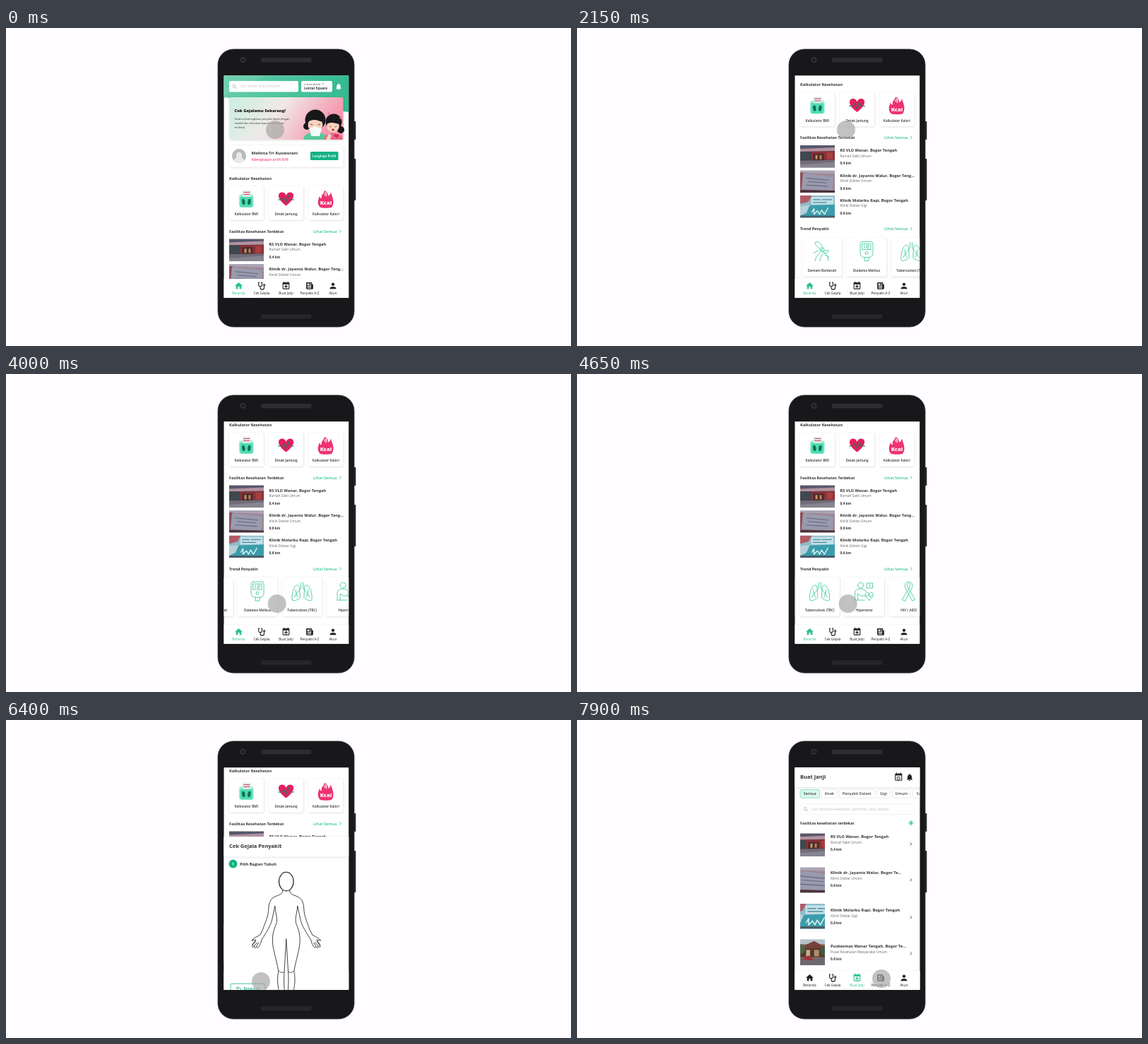
These frames come from a looping animation (800 by 450 pixels, 8000 ms). An HTML page:

```html
<!DOCTYPE html>
<html lang="id">
<head>
<meta charset="utf-8">
<title>Health app walkthrough</title>
<style>
html, body { margin: 0; width: 100%; height: 100%; overflow: hidden; background: #fffdff; }
svg { display: block; }
#stage { width: 100vw; height: 100vh; font-family: "Open Sans", "Noto Sans", sans-serif; }
</style>
</head>
<body>
<svg id="stage" viewBox="0 0 800 450"></svg>
<script>
const GREEN = '#12b184', MINT = '#2cc295', INK = '#333336', PINK = '#e61e5c';

// ---- drawing helpers ----
const text = (x, y, str, size, weight = 400, color = INK, anchor = 'start') =>
  `<text x="${x}" y="${y}" font-size="${size}" font-weight="${weight}" fill="${color}" text-anchor="${anchor}">${str}</text>`;
const rect = (x, y, w, h, fill, r = 0, extra = '') =>
  `<rect x="${x}" y="${y}" width="${w}" height="${h}" rx="${r}" fill="${fill}" ${extra}/>`;
const circle = (x, y, r, fill, extra = '') => `<circle cx="${x}" cy="${y}" r="${r}" fill="${fill}" ${extra}/>`;
const ellipse = (x, y, rx, ry, fill, extra = '') =>
  `<ellipse cx="${x}" cy="${y}" rx="${rx}" ry="${ry}" fill="${fill}" ${extra}/>`;
const path = (d, fill, extra = '') => `<path d="${d}" fill="${fill}" ${extra}/>`;
const line = (d, color, width = 1) =>
  path(d, 'none', `stroke="${color}" stroke-width="${width}" stroke-linecap="round" stroke-linejoin="round"`);
const at = (x, y, body, scale = 1) => `<g transform="translate(${x} ${y}) scale(${scale})">${body}</g>`;
const card = (x, y, w, h) => rect(x, y, w, h, '#fff', 2, 'filter="url(#soft)"');
const chevron = (x, y, color) => line(`M${x - .9} ${y - 1.7}l1.7 1.7l-1.7 1.7`, color, .9);
const magnifier = (x, y) => line(`M${x + 1.3} ${y + 1.3}l2 2`, '#aaa', .8) +
  circle(x - .4, y - .4, 2.1, 'none', 'stroke="#aaa" stroke-width=".7"');

// Icons live on a 24-unit grid.
const ICONS = {
  home: 'M10 20v-6h4v6h5v-8h3L12 3 2 12h3v8z',
  person: 'M12 12c2.2 0 4-1.8 4-4s-1.8-4-4-4-4 1.8-4 4 1.8 4 4 4zm0 2c-2.7 0-8 1.3-8 4v2h16v-2c0-2.7-5.3-4-8-4z',
  bell: 'M12 22c1.1 0 2-.9 2-2h-4c0 1.1.9 2 2 2zm6-6v-5c0-3.1-1.6-5.6-4.5-6.3V4a1.5 1.5 0 0 0-3 0v.7C7.6 5.4 6 7.9 6 11v5l-2 2v1h16v-1z',
  calendar: 'M19 3h-1V1h-2v2H8V1H6v2H5a2 2 0 0 0-2 2v14a2 2 0 0 0 2 2h14a2 2 0 0 0 2-2V5a2 2 0 0 0-2-2zm0 16H5V8h14z',
  plus: 'M10.8 9.5h2.4v2.8h2.8v2.4h-2.8v2.8h-2.4v-2.8H8v-2.4h2.8z',
  news: 'M3 3h15v5h3v11a2 2 0 0 1-2 2H5a2 2 0 0 1-2-2zM6 6v5h5V6zM13 6v2h3V6zM13 10v2h3v-2zM6 13v2h10v-2zM6 17v2h10v-2z',
};
const icon = (name, x, y, size, color) =>
  at(x - size / 2, y - size / 2, path(ICONS[name], color, 'fill-rule="evenodd"'), size / 24);
const stethoscope = (x, y, color) => at(x - 6.5, y - 6.5,
  line('M6 3H4v6a4.5 4.5 0 0 0 9 0V3h-2M8.5 13.5v3a5 5 0 0 0 10 0V12', color, 2) +
  circle(18.7, 9.5, 2, 'none', `stroke="${color}" stroke-width="2"`), .54);

const HEART = 'M0 9C-14-1-11-9-5.5-9C-3-9-1-7.5 0-5C1-7.5 3-9 5.5-9C11-9 14-1 0 9z';

function nav(active) {
  const tabs = [['Beranda', 329.5, 'home'], ['Cek Gejala', 362, ''], ['Buat Janji', 396.5, 'calendar'],
    ['Penyakit A-Z', 430, 'news'], ['Akun', 463, 'person']];
  return rect(308, 355, 178, 27, '#fff', 0, 'filter="url(#soft)"') + tabs.map(([label, x, name], i) => {
    const color = i === active ? MINT : '#222';
    return (name ? icon(name, x, 364.8, 13, color) : stethoscope(x, 365, color)) +
      (name === 'calendar' ? icon('plus', x, 364.8, 13, color) : '') +
      text(x, 377, label, 4.7, 400, color, 'middle');
  }).join('');
}

// ---- picture stand-ins, 50 x 32 ----
const PHOTOS = [
  rect(0, 0, 50, 32, '#5d3a42') + path('M0 0H50V4L0 7z', '#57586c') + path('M0 5L50 3V8L0 9z', '#b3929f') +
    rect(0, 9, 16, 13, '#3f474f') + rect(16, 9, 34, 12, '#8a3038') + rect(19, 12, 15, 10, '#452c2d') +
    rect(22, 14, 3, 6, '#cf8f62') + rect(28, 14, 3, 6, '#c07f58') + rect(38, 10, 9, 10, '#a73f40') +
    path('M0 22L50 21V32H0z', '#716c77') + path('M0 28L50 24V32H0z', '#858490'),
  rect(0, 0, 50, 32, '#9f8793') + path('M0 0H50V5L0 3z', '#a9a4b6') + rect(0, 3, 5, 24, '#8f4b55') +
    path('M4 4L48 9L46 29L2 27z', '#9a9aae') +
    line('M9 11L41 14M12 16L38 18M9 21L40 23', '#66667f', 1.1) + path('M0 28L50 29V32H0z', '#49343d'),
  rect(0, 0, 50, 32, '#8dbccb') + path('M0 0H17L12 9L0 12z', '#b25a66') + rect(16, 2, 32, 11, '#c5e0e6') +
    line('M19 6H29M32 6H45M19 10H38', '#4a8fa6', 1.4) + path('M0 15L50 13V32H0z', '#3a9dab') +
    path('M0 15L14 14L9 25L0 29z', '#b9cfd7') + line('M17 24l3-5v8l5-5 3 5 3-6 4 6 5-9', '#e0f3f4', 1.4) +
    rect(0, 29, 50, 3, '#4b5c68'),
  rect(0, 0, 50, 32, '#8b6a56') + rect(0, 0, 50, 6, '#b4c2cc') + path('M7 11L27 2L45 12z', '#77403a') +
    rect(10, 11, 31, 11, '#53392f') + circle(10, 12, 6, '#4b6549') + circle(40, 14, 6, '#405a41') +
    rect(17, 13, 5, 8, '#c8ab83') + rect(27, 13, 6, 8, '#b58d67') + rect(0, 23, 50, 9, '#6d6970') +
    path('M12 25l8-5 7 6z', '#a32f38'),
];
const photo = (i, x, y, w, h) =>
  `<svg x="${x}" y="${y}" width="${w}" height="${h}" viewBox="0 0 50 32" preserveAspectRatio="xMidYMid slice">${PHOTOS[i]}</svg>`;

const PLACES = [
  ['RS VLO Wanar, Bogor Tengah', 'Rumah Sakit Umum', '0,4 km'],
  ['Klinik dr. Jayanto Walur, Bogor Teng...', 'Klinik Dokter Umum', '0,6 km'],
  ['Klinik Molarku Rapi, Bogor Tengah', 'Klinik Dokter Gigi', '0,6 km'],
  ['Puskesmas Wanar Tengah, Bogor Te...', 'Pusat Kesehatan Masyarakat Umum', '0,6 km'],
];
const place = (x, y, [name, kind, distance], size) => text(x, y, name, size, 700) +
  text(x, y + 7.5, kind, 4.75, 400, '#666') + text(x, y + 18, distance, 4.8, 700);

// ---- home screen ----
const children =
  circle(438, 130, 14.5, '#18171a') + circle(426, 139, 5, '#18171a') +
  path('M421 158C422 149 430 148 438 148S454 149 456 158z', '#54c99c') +
  ellipse(438, 137, 10.5, 10, '#fbd2bf') + path('M427 133C430 124 447 124 449 133C442 132 437 127 427 133z', '#18171a') +
  line('M431 136l3 1M445 136l-3 1', '#333', .8) + path('M430 142L438 139L447 143L444 153L432 153z', '#f2fbf8') +
  circle(464, 133, 11.5, '#18171a') + circle(474, 144, 5, '#18171a') +
  path('M450 158C451 150 458 149 464 149S476 151 477 158z', '#e8688a') +
  ellipse(463, 139, 8.8, 8.6, '#fbd2bf') + path('M454 136C456 129 469 128 472 136C466 135 461 132 454 136z', '#18171a') +
  line('M458 139l2 1M468 139l-2 1', '#333', .8) + ellipse(463, 144, 2, 1.5, '#a93a4c') +
  path('M453 158L457 149L461 152L459 158z', '#fbd2bf') + at(468, 153, path(HEART, '#d92955'), .3) +
  circle(457, 121, 1.6, '#ef7895') + circle(474, 127, 1.8, '#ef7895');

const header = path('M308 66H486V119L308 98z', 'url(#headGrad)') + path('M308 66H370L308 96z', '#fff', 'opacity=".08"') +
  rect(316, 75, 98, 15.5, '#fff', 2) + magnifier(323.5, 82.6) +
  text(331.5, 84.4, 'Cari dokter atau penyakit', 4.8, 400, '#c6c6c6') +
  rect(418, 75, 44, 15.5, '#fff', 2) + text(422, 80.6, 'Lokasi Anda', 4.1, 400, '#555') +
  line('M447.5 78.5l1.3 1.2l1.3-1.2', '#555', .6) + text(422, 87, 'Lontar Square', 4.7, 700) +
  icon('bell', 471, 83, 11.5, '#fff');

const banner = rect(316, 98, 161.5, 60, 'url(#bannerGrad)', 3, 'filter="url(#soft)"') +
  text(323.5, 119.3, 'Cek Gejalamu Sekarang!', 5.8, 800, '#111') +
  ['Ketahui kemungkinan penyakit Anda dengan', 'mudah dan temukan layanan kesehatan', 'terdekat.']
    .map((s, i) => text(323.5, 129.6 + i * 6.2, s, 3.75, 400, '#333')).join('') + children;

const profile = card(316, 166, 161.5, 30.5) + circle(330, 181, 10, '#b9babb') +
  path('M322.5 187.5C324 184 326 185 326 181C325 174 335 174 334 181C334 185 336 184 337.5 187.5A10 10 0 0 1 322.5 187.5z', '#e9e9e9') +
  text(347.5, 179.4, 'Melinta Tri Kusworani', 6, 700) + text(347.5, 188, 'Kelengkapan profil 60%', 4.8, 400, PINK) +
  rect(431, 175, 39.5, 12, GREEN, 1.5) + text(450.7, 182.8, 'Lengkapi Profil', 4.65, 600, '#fff', 'middle');

const scale = rect(-10.5, -7, 21, 19, '#a5f0d8', 4) + rect(-9, -4, 18, 15.5, '#4fdcb1', 3) +
  rect(-5.5, -12, 12, 9, '#dcebe6', 1) + line('M-3.5-9.5H4.5M-3.5-6.5H4.5', '#d5455f', 1.2) +
  ellipse(-4, 4, 2.2, 4.2, '#0c7159', 'transform="rotate(-10 -4 4)"') + ellipse(4, 4, 2.2, 4.2, '#0c7159', 'transform="rotate(10 4 4)"');
const pulse = path(HEART, PINK, 'transform="scale(1.05)"') + line('M-11 1H-5L-3-3L0 5L3-6L5 1H11', '#15806a', 1);
const flame = path('M-8 12C-13 7-11 1-9-4C-8-1-7-1-6-1C-7-7-2-8-2-12C2-11 4-7 3-4C5-5 7-7 7-10C8-5 14 5 8 12C5 13-5 13-8 12z', '#ee3272') +
  path('M-3-6C-2-10 0-9 0-12C3-9 2-6 1-3z', '#f7a3bb') + text(0, 8, 'Kcal', 7.6, 800, '#fff', 'middle');
const calculators = text(316, 214.5, 'Kalkulator Kesehatan', 5.55, 700) +
  [['Kalkulator BMI', scale], ['Detak Jantung', pulse], ['Kalkulator Kalori', flame]].map(([label, art], i) =>
    card(316 + i * 56.3, 224, 48.5, 47.5) + at(340.3 + i * 56.3, 242, art) +
    text(340.3 + i * 56.3, 265.3, label, 4.7, 600, INK, 'middle')).join('');

const sectionTitle = (y, title) => text(316, y, title, 5.4, 700) +
  text(435, y, 'Lihat Semua', 5.6, 600, MINT) + chevron(473.5, y - 2, MINT);
const facilities = sectionTitle(289.5, 'Fasilitas Kesehatan Terdekat') + PLACES.slice(0, 3).map((p, i) =>
  photo(i, 316, 298.5 + i * 35.5, 49, 31.5) + place(372.5, 307.8 + i * 35.3, p, 5.65)).join('');

const DISEASES = [
  ['Demam Berdarah', 'M-3-3L10 8M-3-3a3 3 0 1 0 3-3M-5-2l-7 4M0-2C2-12-8-16-10-13C-9-8-5-5-1-4M2 0C12-6 12 2 3 2M-2 1l-6 6-2 6M1 3l-3 5-1 5M5 5l3 2 1 6'],
  ['Diabetes Melitus', 'M-6-14H6a3 3 0 0 1 3 3V2C9 6 6 8 4 8H-4C-6 8-9 6-9 2V-11a3 3 0 0 1 3-3zM-6-11H6V-3H-6zM-3-9V-5M0-9H3V-7H0V-5H3M-2 2a2 2 0 1 0 4 0a2 2 0 1 0-4 0M-3 8v5H3V8'],
  ['Tuberculosis (TBC)', 'M-1.5-13V-5C-3-2-6 0-8 3M1.5-13V-5C3-2 6 0 8 3M-4-8C-10-14-15 2-14 11C-13 15-5 11-3 9zM4-8C10-14 15 2 14 11C13 15 5 11 3 9zM-9-3L-8 3L-11 8M-8 3L-6 8M9-3L8 3L11 8M8 3L6 8'],
  ['Hipertensi', 'M-9-9a4 4 0 1 0 8 0a4 4 0 1 0-8 0M-13 12V2C-13-3-8-4-5-4S2-2 3 0M-9 12V3L-4 6H1M-13 12H1M7 12C-1 6 1 1 4 1C6 1 7 3 7 4C7 3 8 1 10 1C14 1 14 7 7 12zM2 6H5L7 3L8 8L10 6H12M4-12H12V-5H4zM8-10V-7'],
  ['HIV / AIDS', 'M-9 11L1-6C3-10 2-12 0-12S-3-10-1-6L9 11L5 13L-4-4C-7-10-4-14 0-14S7-10 4-4L-5 13z'],
  ['Gangguan Jiwa', 'M0-12C-4-15-8-12-8-10C-13-9-13-4-12-2C-15 2-12 7-9 7C-8 12-3 13 0 11C3 13 8 12 9 7C12 7 15 2 12-2C13-4 13-9 8-10C8-12 4-15 0-12zM0 6C-9 0-6-5-3-5C-1-5 0-3 0-2C0-3 1-5 3-5C6-5 9 0 0 6zM-8-5L-10-2M8-5L10-2M-10 3L-7 4M10 3L7 4M0-12V-8M0 8V11M-3 0H-1L0-2L1 2L3 0'],
];
const diseases = sectionTitle(418.5, 'Trend Penyakit') + '<g id="slider">' + DISEASES.map(([label, d], i) =>
  at(347 + i * 63, 0, card(-28, 429, 56, 54.5) + at(0, 449, line(d, '#3cc7a0', .85)) +
    text(0, 477.3, label, 4.75, 600, INK, 'middle'))).join('') + '</g>';

// ---- symptom screen ----
const titleBar = title => rect(308, 67, 178, 315, '#fff') + rect(308, 67, 178, 28, '#fff', 0, 'filter="url(#soft)"') +
  text(316, 83.2, title, 7.5, 700);
const halfBody = 'M-5 143C-5 148-9 149-14 151C-22 154-24 159-25 168C-25 180-30 188-33 198L-37 206C-42 209-46 210-49 214' +
  'L-43 213L-48 220M-43 215L-48 221C-49 224-47 224-45 221L-41 217M-45 221C-46 226-43 225-42 222L-39 217M-42 223C-40 226-38 222-36 217L-35 213' +
  'C-29 204-22 193-20 184L-16 165C-15 177-12 182-14 190C-19 201-21 212-18 226C-15 240-12 250-11 258C-14 270-11 283-8 296L-8 317' +
  'C-11 325-14 328-9 329L-3 327L-3 308C-1 292-4 277-3 262C-2 245-1 229 0 212M-10 257C-8 260-5 260-3 258';
const symptoms = titleBar('Cek Gejala Penyakit') + circle(321.5, 105.5, 6, GREEN) +
  text(321.5, 107.6, '1', 5.8, 700, '#fff', 'middle') + text(331, 107.6, 'Pilih Bagian Tubuh', 5.6, 700) +
  ellipse(396.8, 130.5, 10.3, 13.3, '#fff', 'stroke="#111" stroke-width="1.1"') +
  at(396.8, 0, line(halfBody, '#222', .85) + `<g transform="scale(-1 1)">${line(halfBody, '#222', .85)}</g>`) +
  rect(318, 275, 49, 14, '#fff', 2, `stroke="${GREEN}" stroke-width=".8"`) +
  line('M328.5 279L326.5 281L328.5 283M326.5 281H330C333 281 333 285.5 330 285.5H328', GREEN, .9) +
  text(336.5, 284, 'Belakang', 5, 600, GREEN) + nav(1);

// ---- appointment screen ----
const chips = [['Semua', 316, 27.5], ['Anak', 346, 22.5], ['Penyakit Dalam', 371, 50.5], ['Gigi', 424.5, 19],
  ['Umum', 446.5, 25.5], ['Saraf', 475.5, 24]].map(([label, x, w], i) =>
  rect(x, 98.3, w, 12, i ? '#fff' : '#d9f6eb', 2, `stroke="${i ? '#e2e2e2' : '#7ed8bb'}" stroke-width=".7"`) +
  text(x + w / 2, 106.2, label, 5.4, 600, '#444', 'middle')).join('');
const rowY = [167.3, 218.3, 271.3, 322.4], photoBox = [[160.5, 32.5], [208.5, 36], [260, 35.5], [310.5, 36.5]];
const appointments = titleBar('Buat Janji') + icon('calendar', 455.3, 80.8, 13.5, '#222') +
  circle(455.3, 82.4, 2.2, 'none', 'stroke="#222" stroke-width=".8"') + line('M455.3 81.3V82.5H456.2', '#222', .5) +
  icon('bell', 471, 81, 12, '#222') + chips +
  rect(316, 118.8, 161.5, 15, '#fff', 2, 'stroke="#efefef" stroke-width=".8"') + magnifier(323.5, 126) +
  text(331.5, 127.8, 'Cari fasilitas kesehatan, poliklinik, atau dokter', 5.2, 400, '#bdbdbd') +
  text(316, 147.6, 'Fasilitas kesehatan terdekat', 5.4, 700) +
  circle(473, 145.7, 2.4, 'none', `stroke="${MINT}" stroke-width=".8"`) + circle(473, 145.7, 1.2, GREEN) +
  line('M473 142.3v1M473 148v1M469.6 145.7h1M475.4 145.7h1', MINT, .7) +
  PLACES.map((p, i) => photo(i, 316, photoBox[i][0], 35, photoBox[i][1]) +
    place(359, rowY[i], [p[0].replace('Teng...', 'Te...'), p[1], p[2]], 5.75) +
    chevron(473, rowY[i] + 8, '#333')).join('') + nav(2);

// ---- phone ----
document.getElementById('stage').innerHTML = `<defs>
  <clipPath id="screen"><rect x="308.5" y="67.3" width="176.7" height="314.4"/></clipPath>
  <filter id="soft" x="-20%" y="-20%" width="140%" height="150%"><feDropShadow dx=".6" dy=".8" stdDeviation="1.6" flood-color="#333" flood-opacity=".15"/></filter>
  <linearGradient id="headGrad"><stop stop-color="#66cca9"/><stop offset="1" stop-color="#32ba91"/></linearGradient>
  <linearGradient id="bannerGrad" y2=".25"><stop stop-color="#caf0e1"/><stop offset=".48" stop-color="#efe9e8"/><stop offset="1" stop-color="#f598ad"/></linearGradient>
  </defs>` +
  rect(490, 132, 5.3, 26, '#202022', 1) + rect(490, 185, 5.3, 59, '#202022', 1) +
  rect(300, 30, 193, 393, '#18171a', 22, 'stroke="#343336" stroke-width=".8"') +
  circle(335.5, 45, 4.2, '#303033') + circle(335.5, 45, 2, '#18191d') +
  rect(361, 42, 71.5, 6.5, '#2d2d2f', 2) + rect(361, 405, 71.5, 6.5, '#262628', 2) +
  `<g clip-path="url(#screen)">${rect(308, 67, 178, 315, '#fff')}
    <g id="home">${header + banner + profile + calculators + facilities + diseases}</g>${nav(0)}
    <g id="symptoms">${symptoms}</g><g id="appointments">${appointments}</g>
    ${circle(0, 0, 13, '#a5a5a5', 'id="cursor" opacity=".68"')}</g>`;

// ---- motion ----
const easeOut = power => x => 1 - (1 - x) ** power;
const easeInOut = x => x * x * (3 - 2 * x);
const progress = (t, start, end, ease) => ease(Math.min(1, Math.max(0, (t - start) / (end - start))));

const cursorMoves = [
  [2900, 3700, 383.7, 325, easeOut(2.2)],
  [5150, 5300, 425, 321, easeInOut],
  [5300, 5850, 361, 370, easeInOut],
  [6900, 7080, 396, 367, easeInOut],
  [7750, 7900, 431, 366, easeInOut],
];
function cursorAt(t) {
  let x = 381, y = 144;
  for (const [start, end, toX, toY, ease] of cursorMoves) {
    const p = progress(t, start, end, ease);
    x += (toX - x) * p;
    y += (toY - y) * p;
  }
  return [x, y];
}

const move = (id, x, y) => document.getElementById(id).setAttribute('transform', `translate(${x} ${y})`);
function draw(now) {
  const t = now % 8000;
  move('home', 0, -115 * progress(t, 400, 1250, easeInOut) - 26 * progress(t, 1900, 2400, easeOut(1.6)));
  move('slider', -106 * (progress(t, 3750, 4450, easeOut(1.6)) + progress(t, 4550, 5250, easeOut(1.6))), 0);
  move('symptoms', 0, 318 - 318 * progress(t, 5950, 6780, easeOut(1.5)));
  move('appointments', 0, 318 - 318 * progress(t, 7080, 7750, easeOut(1.5)));
  move('cursor', ...cursorAt(t));
  requestAnimationFrame(draw);
}
draw(performance.now());
</script>
</body>
</html>
```
